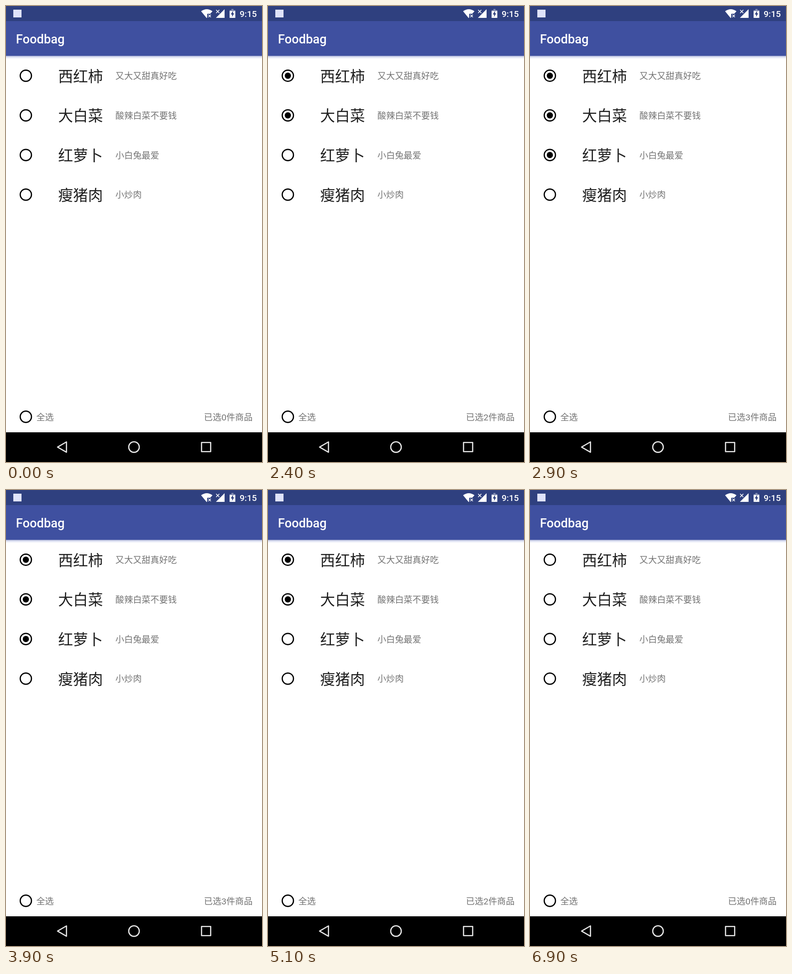
Write an HTML page that moves like this. It is 561 by 998 pixels and loops after 8.5 s.

```html
<!DOCTYPE html>
<html lang="zh-CN">
<head>
<meta charset="utf-8">
<title>Foodbag</title>
<style>
  html, body { margin: 0; width: 100%; height: 100%; overflow: hidden; background: #fff; }
  svg { display: block; width: 100%; height: 100%; }
  text { font-family: Roboto, "Noto Sans CJK SC", "Noto Sans CJK", sans-serif; }
  .name { font-size: 32.72px; fill: #1f1f1f; }
  .note { font-size: 19.2px; fill: #737373; }
  .bar { fill: #fff; font-weight: 500; }
  .nav { fill: none; stroke: #e6e6e6; stroke-width: 2.6; stroke-linejoin: round; }
  .ring { fill: none; stroke: #000; stroke-width: 2.73; }
</style>
</head>
<body>
<svg viewBox="0 0 561 998">
  <defs>
    <linearGradient id="shade" x2="0" y2="1">
      <stop offset="0" stop-color="#a3abd0"/>
      <stop offset=".4" stop-color="#dfe3f4"/>
      <stop offset="1" stop-color="#fff"/>
    </linearGradient>
  </defs>
  <rect width="561" height="998" fill="#fff"/>
  <rect y="109" width="561" height="7" fill="url(#shade)"/>
  <rect y="32" width="561" height="77" fill="#3f50a0"/>
  <rect width="561" height="33" fill="#2f407f"/>

  <!-- status bar -->
  <rect x="16" y="8" width="18" height="17" fill="#dfe3fa"/>
  <g fill="#fff">
    <path d="M427.5 11.5Q440 2.5 452.5 11.5L447.5 17H441V24.5L439.8 26.5Z"/>
    <path d="M460 26L479 7V26Z"/>
    <path d="M490 11H502.500V26H490Z"/>
    <path d="M490 9H494V6.500H498.500V9H502.500V11H490Z" opacity=".4"/>
  </g>
  <path d="M443.500 19l5.500 5.500m0-5.500l-5.500 5.500M460.500 8.500l7 7m0-7l-7 7" stroke="#fff" stroke-width="1.6"/>
  <path d="M497.500 10.500L492.500 18.500H495.500V24L500 16H497.500Z" fill="#2f407f"/>
  <text class="bar" x="512" y="24" font-size="19.1">9:15</text>
  <text class="bar" x="21.8" y="81.5" font-size="27.27">Foodbag</text>

  <g id="list"></g>

  <text class="note" x="66.4" y="906.7">全选</text>
  <text class="note" x="540.5" y="906.7" text-anchor="end" id="total"></text>

  <!-- navigation bar -->
  <rect y="933" width="561" height="65" fill="#000"/>
  <g class="nav">
    <path d="M113 965.300L132.500 954V976.600Z"/>
    <circle cx="280.5" cy="965.3" r="11.6"/>
    <rect x="428.5" y="955.3" width="20" height="20"/>
  </g>
</svg>
<script>
const goods = [
  ["西红柿", "又大又甜真好吃"],
  ["大白菜", "酸辣白菜不要钱"],
  ["红萝卜", "小白兔最爱"],
  ["瘦猪肉", "小炒肉"]
];
const LOOP = 8500;
// [start time, number of goods ticked from the top]
const steps = [[0, 0], [1000, 1], [2400, 2], [2900, 3], [3500, 4], [3900, 3], [5100, 2], [6100, 1], [6900, 0]];

const list = document.getElementById("list");
const total = document.getElementById("total");

const radio = y => `<circle class="ring" cx="43.5" cy="${y}" r="12.3"/>
  <circle class="dot" cx="43.5" cy="${y}" r="6.8"/>`;

list.innerHTML = goods.map(([name, note], i) => {
  const y = 152.6 + i * 86.75;
  return `${radio(y)}
    <text class="name" x="114.3" y="${y + 13}">${name}</text>
    <text class="note" x="239.8" y="${y + 7.5}">${note}</text>`;
}).join("") + radio(899);

const dots = list.querySelectorAll(".dot");

function draw(now) {
  const t = now % LOOP;
  const count = steps.findLast(([start]) => t >= start)[1];
  dots.forEach((dot, i) => {
    const on = i < goods.length ? i < count : count === goods.length;
    dot.setAttribute("visibility", on ? "visible" : "hidden");
  });
  total.textContent = `已选${count}件商品`;
}

function tick() {
  draw(performance.now());
  requestAnimationFrame(tick);
}
tick();
</script>
</body>
</html>
```
